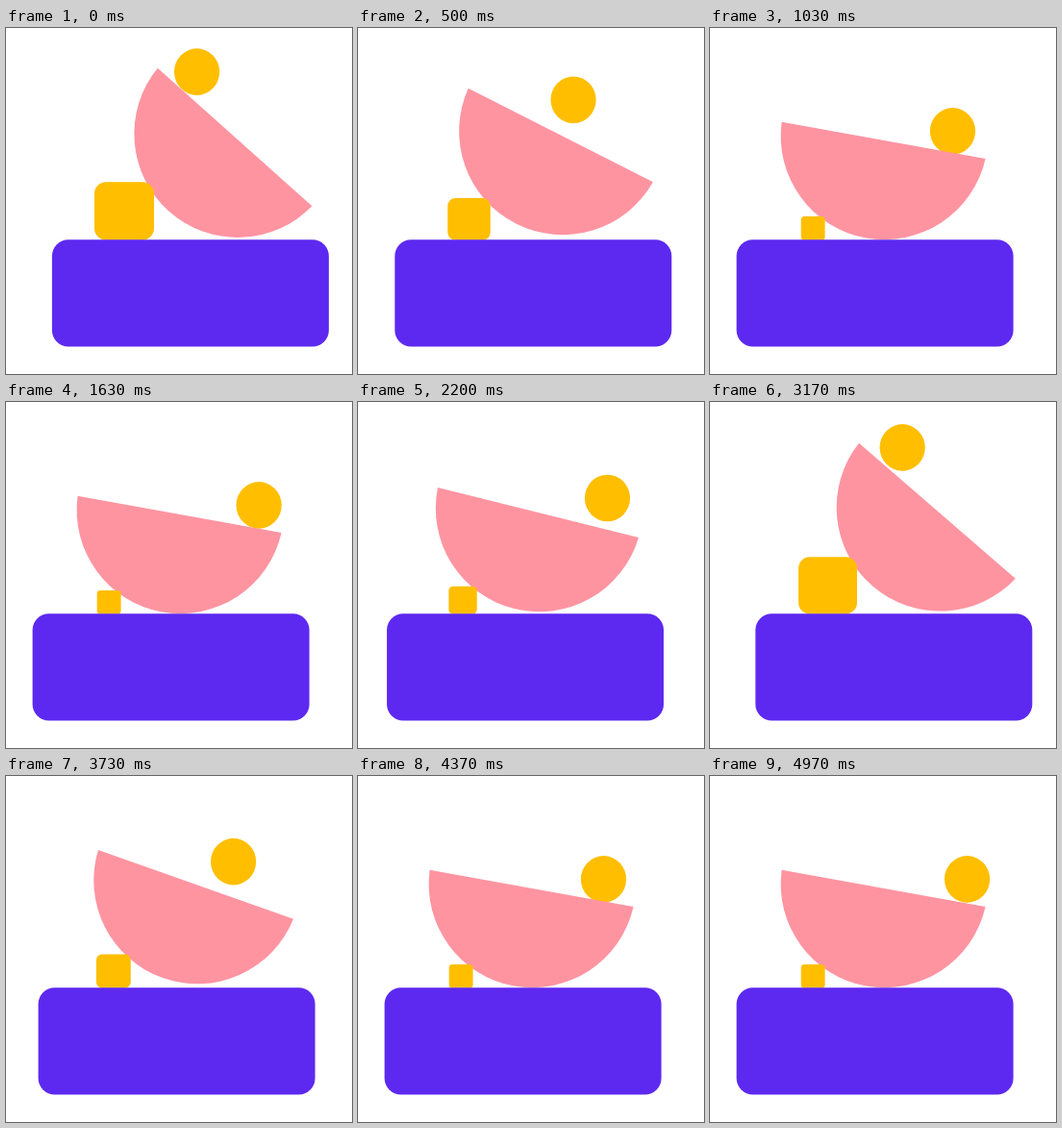
Recreate the animation shown at these times as an HTML page. Size 360x360 px, loop 5 s.

```html
<!DOCTYPE html>
<html>
<head>
<meta charset="utf-8">
<style>
html, body { margin: 0; width: 100%; height: 100%; overflow: hidden; background: #fff; }
svg { display: block; width: 100vw; height: 100vh; }
</style>
</head>
<body>
<svg viewBox="0 0 360 360">
  <ellipse id="ball" rx="23.6" ry="24.3" fill="#ffbe00"/>
  <path id="bowl" d="M-107.7 4A107.8 107.8 0 0 0 107.7 4Z" fill="#ff94a1"/>
  <rect id="box" fill="#ffbe00"/>
  <rect id="base" y="220.3" width="288" height="111.2" rx="17" fill="#5d29f0"/>
</svg>
<script>
const LOOP = 5000, CYCLE = 3065;
const FALL_END = 1040, RISE_START = 1975, RISE_END = 3020;
const REST_TILT = 10.2, SWING = 31.6, RADIUS = 107.8;

const [ball, bowl, box, base] = ['ball', 'bowl', 'box', 'base'].map(id => document.getElementById(id));

const mix = (a, b, k) => a + (b - a) * k;

function ease(t, from, to) {
  const s = Math.min(1, Math.max(0, (t - from) / (to - from)));
  return s * s * (3 - 2 * s);
}

function set(el, attrs) {
  for (const name in attrs) el.setAttribute(name, attrs[name]);
}

function draw(time) {
  const t = time % LOOP % CYCLE;
  // lift: 1 when fully tipped up, 0 at rest
  const lift = t < FALL_END ? 1 - ease(t, 0, FALL_END) : ease(t, RISE_START, RISE_END);
  const drift = ease(t, FALL_END, RISE_START);

  // the bowl rolls without slipping
  const turn = SWING * lift;
  const x = 181.3 + RADIUS * turn * Math.PI / 180;
  const y = 113 - 17.7 * lift + 15.3 * lift * lift;
  set(bowl, { transform: `translate(${x} ${y}) rotate(${REST_TILT + turn})` });

  set(ball, {
    cx: mix(mix(252.5, 267.8, drift), 198.6, lift),
    cy: mix(107.4, 45.6, lift)
  });

  const left = mix(94.7, 92, lift), top = mix(196, 160.2, lift);
  set(box, {
    x: left,
    y: top,
    width: mix(119.6, 154, lift) - left,
    height: 220.5 - top,
    rx: mix(3.5, 12, lift)
  });

  set(base, { x: mix(27.6, 47.9, lift) });
}

const start = performance.now();
function tick() {
  draw(performance.now() - start);
  requestAnimationFrame(tick);
}
tick();
</script>
</body>
</html>
```
